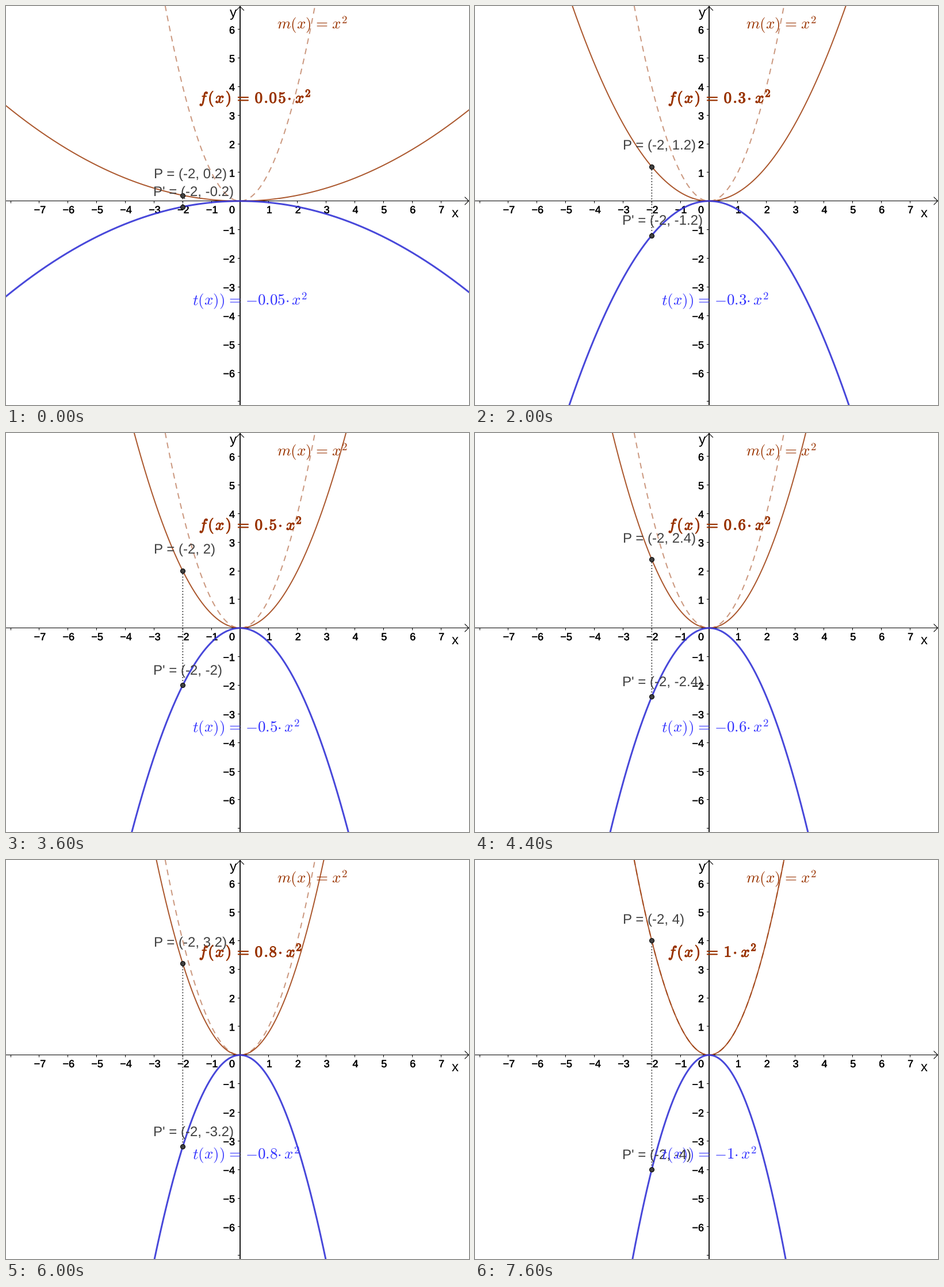
Recreate the animation shown at these times as a matplotlib script. Size 805 px wide and 695 px high, loop 8000 ms.

```python
import numpy as np
import matplotlib.pyplot as plt
from matplotlib import patheffects
from matplotlib.animation import FuncAnimation

WIDTH, HEIGHT, DPI = 805, 695, 80
PX = 72 / DPI                      # points per pixel
OX, OY, UNIT = 407, 339.75, 49.87
AXIS_Y = 339.5                     # centre of the pixel row of the x axis
FRAMES, INTERVAL = 20, 400
POINT_X = -2

BROWN, BLUE, INK = "#993300", "#3333ff", "#404040"

plt.rcParams.update({
    "font.family": "Liberation Sans",
    "mathtext.fontset": "cm",
    "lines.scale_dashes": False,
    "text.hinting": "no_hinting",
})

fig = plt.figure(figsize=(WIDTH / DPI, HEIGHT / DPI), dpi=DPI, facecolor="white")
ax = fig.add_axes([0, 0, 1, 1])
ax.set(xlim=(0, WIDTH), ylim=(HEIGHT, 0))
ax.axis("off")


def sx(x):
    return OX + UNIT * x


def sy(y):
    return OY - UNIT * y


def line(x, y, color, width, **style):
    return ax.plot(x, y, color=color, lw=width * PX, snap=False, **style)[0]


def label(x, y, text="", size=24, color="black", ha="left", stroke=0, **style):
    if stroke:
        style["path_effects"] = [
            patheffects.withStroke(linewidth=stroke * PX, foreground=color)]
    return ax.text(x, y, text, fontsize=size * PX, color=color, ha=ha,
                   va="baseline", **style)


def tick_label(x, y, n, ha):
    label(x, y, str(n).replace("-", "\u2212"), 18, ha=ha, stroke=0.45, zorder=1)


def pixel(v):
    return np.floor(v) + 0.5


def draw_axes():
    line([0, WIDTH], [AXIS_Y] * 2, "black", 1, zorder=1)
    line([OX] * 2, [0, HEIGHT], "black", 1.8, zorder=1)
    line([798, 804.5, 798], AXIS_Y + np.array([-6.5, 0, 6.5]), "black", 1.1, zorder=1)
    line([OX - 6.5, OX, OX + 6.5], [7.5, 1, 7.5], "black", 1.1, zorder=1)
    for n in range(-8, 8):
        if n == 0:
            continue
        line([pixel(sx(n))] * 2, [AXIS_Y, AXIS_Y + 3.5], "black", 1, zorder=1)
        if n > -8:
            tick_label(sx(n) + 1, 361, n, "center")
        if n < 7:
            line([OX - 3.5, OX], [pixel(sy(n))] * 2, "black", 1, zorder=1)
        if -7 < n < 7:
            tick_label(398, sy(n) + 7.5, n, "right")
    tick_label(398, 361, 0, "right")
    label(394.5, 19, "y", ha="center", zorder=1)
    label(780.5, 367.5, "x", ha="center", zorder=1)


EQUALS = r"\hspace{0.11}=\hspace{0.11}"
TIMES = r"{\cdot}\,"


def bold_formula(number):
    """Letter-spaced formula, to be drawn with a thickening stroke."""
    digits = [r".\hspace{-0.24}" if c == "." else c for c in number]
    parts = ["f", "(", "x", ")", EQUALS, *digits, TIMES, "x^2"]
    return "$" + r"\hspace{0.1}".join(parts) + "$"


draw_axes()

x = np.linspace(-8.3, 8.3, 1200)
xm = np.linspace(-2.63, 2.63, 400)
line(sx(xm), sy(xm**2), BROWN, 2, alpha=0.5, dashes=(10 * PX, 8 * PX), zorder=2)
f_curve = line(sx(x), sy(x), BROWN, 2, alpha=0.82, zorder=3)
t_curve = line(sx(x), sy(x), "#2f2fd5", 3, alpha=0.88, zorder=4)
link = line([], [], "#666666", 2.2, dashes=(2 * PX, 3 * PX), zorder=5)
points = line([], [], INK, 1, ls="none", marker="o", ms=8 * PX,
              mec="black", mew=1 * PX, zorder=6)

p_label = label(257.3, 0, color=INK, zorder=7)
q_label = label(256.3, 0, color=INK, zorder=7)
label(471, 40, f"$m(x){EQUALS}x^2$", 27, BROWN, zorder=8)
f_label = label(335.5, 168.5, "", 27, BROWN, stroke=1.1, zorder=8)
t_label = label(324.5, 521, "", 27, BLUE, zorder=8)


def update(frame):
    a = round(0.05 * (frame + 1), 2)
    y = round(a * POINT_X**2, 2)
    f_curve.set_ydata(sy(a * x**2))
    t_curve.set_ydata(sy(-a * x**2))

    xs, ys = [sx(POINT_X)] * 2, [sy(y), sy(-y)]
    link.set_data(xs, ys)
    points.set_data(xs, ys)
    p_label.set_text(f"P = ({POINT_X}, {y:g})")
    p_label.set_y(ys[0] - 29.5)
    q_label.set_text(f"P' = ({POINT_X}, {-y:g})")
    q_label.set_y(ys[1] - 18.5)

    f_label.set_text(bold_formula(f"{a:g}"))
    t_label.set_text(f"$t(x)){EQUALS}{{-}}{a:g}{TIMES}x^2$")
    return f_curve, t_curve, link, points, p_label, q_label, f_label, t_label


anim = FuncAnimation(fig, update, frames=FRAMES, interval=INTERVAL,
                     repeat=True, repeat_delay=0)
plt.show()
```
